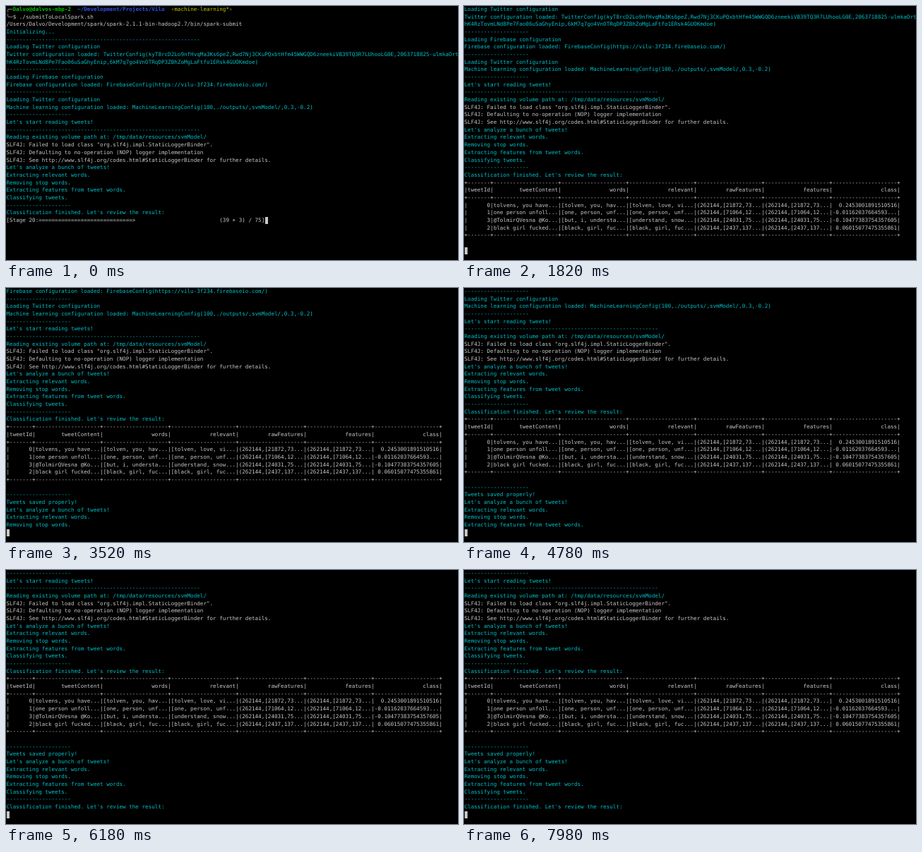
An HTML page that plays this animation: 640 px wide and 360 px high, repeating every 8 s.

```html
<!DOCTYPE html>
<html lang="en">
<head>
<meta charset="utf-8">
<title>Terminal session</title>
<style>
  html, body { margin: 0; width: 100%; height: 100%; overflow: hidden; background: #000; }
  #term {
    position: absolute; left: 0; top: 0; width: 640px; height: 360px; overflow: hidden;
    font: 7.607px/10.68px "DejaVu Sans Mono", monospace;
    font-variant-ligatures: none; text-rendering: geometricPrecision; white-space: pre;
  }
  .row { position: absolute; left: .5px; height: 10.68px; }
  .cyan { color: #00c0c8; }
  .white { color: #c7c7c7; }
  .green { color: #00c200; }
  .yellow { color: #c7c400; }
  .blue { color: #2c50e0; }
  .bold { font-weight: bold; }
  #cursor { position: absolute; width: 4.6px; height: 10px; background: #c7c7c7; }
</style>
</head>
<body>
<div id="term"><div id="cursor"></div></div>
<script>
const LOOP = 8000, ROW = 10.68, COL = 4.58, TOP = -0.1, LEFT = 0.5, ROWS = 33;
const BAR_ROW = 28;

const cyan = (...texts) => texts.map(text => ['cyan', text]);
const white = (...texts) => texts.map(text => ['white', text]);
const rule = n => '-'.repeat(n);

const widths = [7, 20, 20, 20, 20, 20, 20];
const border = '+' + widths.map(w => rule(w) + '+').join('');
const tableRow = cells => '|' + cells.map((c, i) => c.padStart(widths[i]) + '|').join('');
const record = (id, tweet, words, relevant, vector, score) =>
  tableRow([id, tweet, words, relevant, vector, vector, score].map(String));

const analysis = [
  "Let's analyze a bunch of tweets!",
  'Extracting relevant words.',
  'Removing stop words.',
  'Extracting features from tweet words.',
  'Classifying tweets.',
  rule(20),
  "Classification finished. Let's review the result:"
];

const prompt = '<span class="white">╭─</span><span class="green bold">Dalvo@dalvos-mbp-2</span>  ' +
  '<span class="blue bold">~/Development/Projects/Vilu</span>  ' +
  '<span class="yellow">‹machine-learning*›</span>';

const lines = [
  ['html', prompt],
  ...white(
    '╰─$ ./submitToLocalSpark.sh',
    '/Users/Dalvo/Development/spark/spark-2.1.1-bin-hadoop2.7/bin/spark-submit'),
  ...cyan(
    'Initializing...',
    rule(60),
    'Loading Twitter configuration',
    'Twitter configuration loaded: TwitterConfig(kyT8rcD2Lo9nfHvqMa3Ks6peZ,' +
      'Rwd7Nj3CKuPQxbtHfm45WWGQD6zneekiVB39TQ3R7LUhooLG0E,2063718825-ulmkaOrt',
    'hK4RzTovmLNd8Pe7Fao06uSaGhyEnip,6kM7q7go4VnOTRqDP3ZBhZoMgLaFtfo1ERsk4GUOKmdoe)',
    rule(20),
    'Loading Firebase configuration',
    'Firebase configuration loaded: FirebaseConfig(https://vilu-3f234.firebaseio.com/)',
    rule(20),
    'Loading Twitter configuration',
    'Machine learning configuration loaded: MachineLearningConfig(100,./outputs/,svmModel/,0.3,-0.2)',
    rule(20),
    "Let's start reading tweets!",
    rule(60),
    'Reading existing volume path at: /tmp/data/resources/svmModel/'),
  ...white(
    'SLF4J: Failed to load class "org.slf4j.impl.StaticLoggerBinder".',
    'SLF4J: Defaulting to no-operation (NOP) logger implementation',
    'SLF4J: See http://www.slf4j.org/codes.html#StaticLoggerBinder for further details.'),
  ...cyan(...analysis),
  ...white(
    border,
    tableRow(['tweetId', 'tweetContent', 'words', 'relevant', 'rawFeatures', 'features', 'class']),
    border,
    record(0, 'tolvens, you have...', '[tolven, you, hav...', '[tolven, love, vi...',
      '(262144,[21872,73...', '0.2453001891510516'),
    record(1, 'one person unfoll...', '[one, person, unf...', '[one, person, unf...',
      '(262144,[71064,12...', '-0.01162037664593...'),
    record(3, '@TolmirQVesna @Ko...', '[but, i, understa...', '[understand, snow...',
      '(262144,[24031,75...', '-0.10477383754357605'),
    record(2, 'black girl fucked...', '[black, girl, fuc...', '[black, girl, fuc...',
      '(262144,[2437,137...', '0.06015077475355861'),
    border,
    ''),
  ...cyan(rule(20), 'Tweets saved properly!', ...analysis)
];

// Each step: start time, number of printed lines, finished tasks in the progress bar.
const steps = [
  { at: 0, count: 28, done: 39 },
  { at: 200, count: 28, done: 52 },
  { at: 400, count: 28, done: 66 },
  { at: 600, count: 28 },
  { at: 1400, count: 37 },
  { at: 3400, count: 42 },
  { at: 4200, count: 43 },
  { at: 5500, count: 46 }
];

const progress = done => {
  const head = '[Stage 20:', tail = `(${done} + 3) / 75]`;
  const room = 80 - head.length - tail.length;
  return head + ('='.repeat(Math.floor(room * done / 75)) + '>').padEnd(room) + tail;
};

const term = document.getElementById('term');
const cursor = document.getElementById('cursor');

const addRow = ([kind, text]) => {
  const row = document.createElement('div');
  row.className = 'row ' + kind;
  if (kind === 'html') row.innerHTML = text;
  else row.textContent = text;
  return term.appendChild(row);
};
const rows = lines.map(addRow);
const bar = addRow(['white', '']);
bar.style.top = TOP + BAR_ROW * ROW + 'px';

function show({ count, done }) {
  const scroll = Math.max(0, count + 1 - ROWS);
  rows.forEach((row, i) => {
    row.style.display = i >= scroll && i < count ? 'block' : 'none';
    row.style.top = TOP + (i - scroll) * ROW + 'px';
  });
  bar.textContent = done ? progress(done) : '';
  cursor.style.left = LEFT + bar.textContent.length * COL + 'px';
  cursor.style.top = TOP + (count - scroll) * ROW + 'px';
}

const start = performance.now();
let current;
function tick() {
  const time = (performance.now() - start) % LOOP;
  const step = steps.filter(s => s.at <= time).pop();
  if (step !== current) show(current = step);
  requestAnimationFrame(tick);
}
tick();
</script>
</body>
</html>
```
